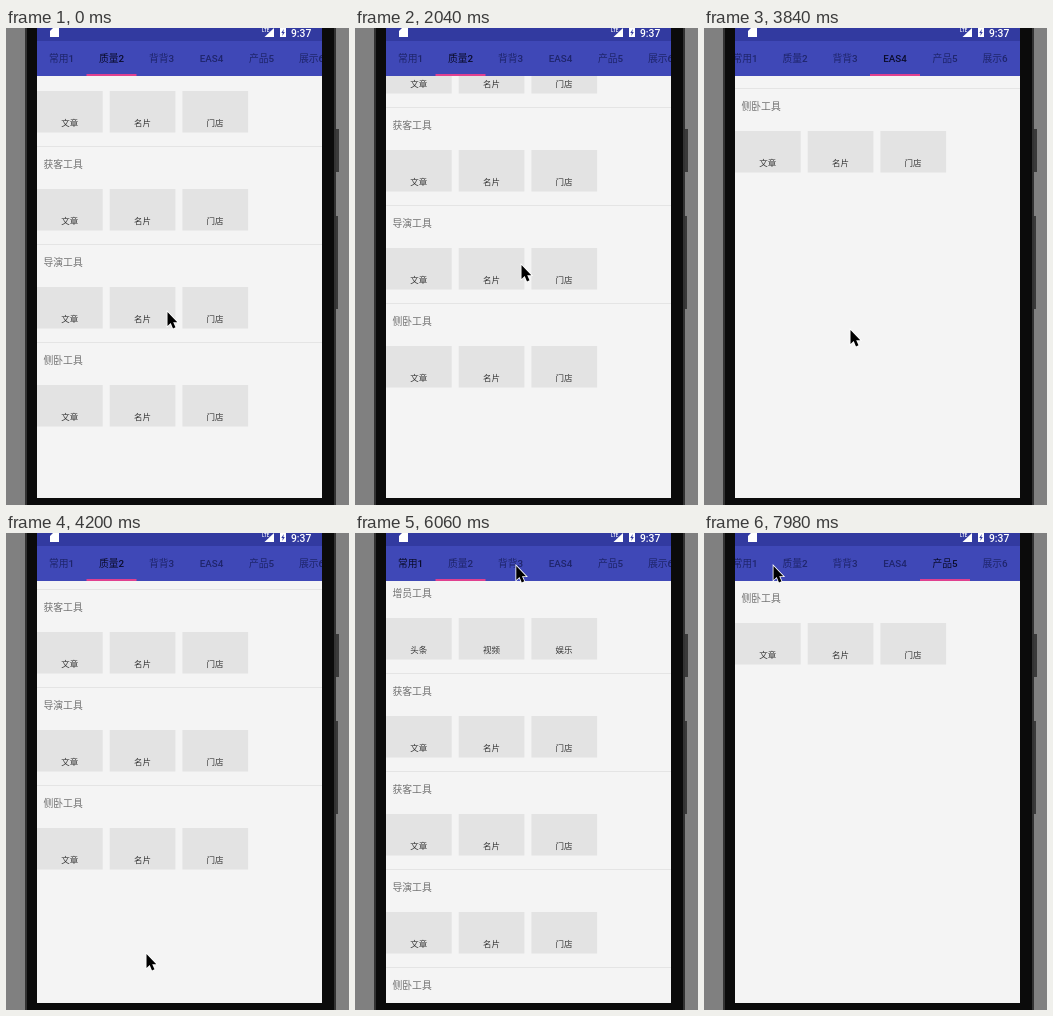
Animation of 343x477 px, one loop 8 s. Source, as an HTML page with a canvas:

```html
<!DOCTYPE html>
<html lang="zh">
<head>
<meta charset="utf-8">
<style>
  html, body { margin: 0; width: 100%; height: 100%; overflow: hidden; background: #808080; }
  canvas { display: block; }
</style>
</head>
<body>
<canvas id="stage" width="343" height="477"></canvas>
<script>
const ctx = document.getElementById('stage').getContext('2d');
const LOOP = 8000, STEP = 60;
const LEFT = 31, RIGHT = 316, WIDTH = RIGHT - LEFT;
const BAR_TOP = 13, LIST_TOP = 48, BOTTOM = 470;
const TAB = 50, SECTION = 98, FIRST_HEADER = 65;
const FONT = 'Roboto, "Noto Sans CJK SC", "Noto Sans CJK", sans-serif';

const tabs = ['常用1', '质量2', '背背3', 'EAS4', '产品5', '展示6'];
const common = ['文章', '名片', '门店'];
const sections = [
  ['增员工具', ['头条', '视频', '娱乐']],
  ['获客工具', common],
  ['获客工具', common],
  ['导演工具', common],
  ['侧卧工具', common]
];

// Turning points of the dragged list: [time, scroll]
const drags = [[600, 125], [1200, 56.5], [2640, 228], [3480, 392], [3735, 392], [4640, 0]];
// Turning points of the pointer: [time, x, y]
const pointer = [
  [120, 161, 283], [1080, 145, 334], [2040, 166, 236], [3840, 146, 301], [4200, 140, 420],
  [4560, 109, 74], [5940, 158, 32], [6960, 240, 32], [7260, 240, 32], [7980, 69, 32]
];
// Each tap moves two tabs on; the indicator leads, the list follows
const taps = [5960, 7260], TABS_PER_TAP = 2;

function ease(u) {
  return (1 - Math.cos(Math.PI * Math.max(0, Math.min(1, u)))) / 2;
}

function glide(stops, t, column) {
  return stops.slice(1).reduce((value, stop, i) => {
    const from = stops[i];
    return value + (stop[column] - from[column]) * ease((t - from[0]) / (stop[0] - from[0]));
  }, stops[0][column]);
}

function tappedTabs(t, delay, duration) {
  return taps.reduce((sum, tap) => sum + TABS_PER_TAP * ease((t - tap - delay) / duration), 0);
}

function rect(color, x, y, w, h) {
  ctx.fillStyle = color;
  ctx.fillRect(x, y, w, h);
}

function shape(color, path) {
  ctx.fillStyle = color;
  ctx.fill(new Path2D(path));
}

function text(string, x, middle, size, color, align = 'center', weight = 400) {
  ctx.font = `${weight} ${size}px ${FONT}`;
  ctx.textAlign = align;
  ctx.fillStyle = color;
  ctx.fillText(string, x, middle + size * 0.37);
}

function drawPhone() {
  rect('#808080', 0, 0, 343, 477);
  rect('#3a3a3a', 330, 101, 3, 43);
  rect('#3a3a3a', 330, 188, 2, 93);
  rect('#333', 19, 0, 311, 477);
  rect('#0b0b0b', 21, 0, 307, 477);
}

function drawList(scroll) {
  rect('#f4f4f4', LEFT, LIST_TOP, WIDTH, BOTTOM - LIST_TOP);
  sections.forEach(([title, items], i) => {
    const y = Math.round(FIRST_HEADER + i * SECTION - scroll);
    if (i) rect('#e4e4e4', LEFT, y - 18, WIDTH, 1);
    text(title, 37.5, y, 9.8, '#707070', 'left');
    items.forEach((label, j) => {
      const x = LEFT + j * 72.7;
      rect('#e3e3e3', x, y + 25, 65.7, 41.5);
      text(label, x + 32.7, y + 57, 8.5, '#383838');
    });
  });
}

function drawTabs(selected, indicator) {
  rect('#3f48b7', LEFT, BAR_TOP, WIDTH, LIST_TOP - BAR_TOP);
  const centre = (indicator + 0.5) * TAB;
  const start = LEFT - Math.max(0, Math.min(14.5, centre - WIDTH / 2));
  tabs.forEach((name, i) => {
    const color = i === selected ? '#0b0d2c' : '#1f256b';
    text(name, start + (i + 0.49) * TAB, 30.5, 9.8, color, 'center', 500);
  });
  rect('#e0408f', start + indicator * TAB - 0.5, LIST_TOP - 2, TAB, 2);
}

function drawStatusBar() {
  rect('#323aa0', LEFT, 0, WIDTH, BAR_TOP);
  shape('#fff', 'M47 0H53V9H44V3Z');
  text('LTE', 256, 2, 4.5, '#fff', 'left', 500);
  shape('#fff', 'M268 0V9H258.5Z');
  rect('#fff', 274, 0, 6, 9);
  shape('#323aa0', 'M277.8 1L275.3 5H276.8L276.3 8L278.8 4H277.3Z');
  text('9:37', 285, 5, 10.3, '#fff', 'left', 500);
}

function drawPointer(x, y) {
  ctx.save();
  ctx.translate(x + 0.5, y + 1);
  const arrow = 'M0 0V14L3.2 11L5.5 16.4L8 15.3L5.7 10.2H9.8Z';
  ctx.lineWidth = 1.6;
  ctx.strokeStyle = '#fff';
  ctx.stroke(new Path2D(arrow));
  shape('#000', arrow);
  ctx.restore();
}

function draw(now) {
  const t = Math.floor(now % LOOP / STEP) * STEP;
  const scroll = glide(drags, t, 1) + SECTION * tappedTabs(t, 60, 400);
  const selected = Math.floor(scroll / SECTION + 0.01);
  const indicator = t < taps[0] ? selected : tappedTabs(t, 0, 200);

  drawPhone();
  ctx.save();
  ctx.beginPath();
  ctx.rect(LEFT, 0, WIDTH, BOTTOM);
  ctx.clip();
  drawList(scroll);
  drawTabs(selected, indicator);
  drawStatusBar();
  ctx.restore();
  drawPointer(glide(pointer, t, 1), glide(pointer, t, 2));
}

const start = performance.now();
function tick() {
  draw(performance.now() - start);
  requestAnimationFrame(tick);
}
tick();
</script>
</body>
</html>
```
